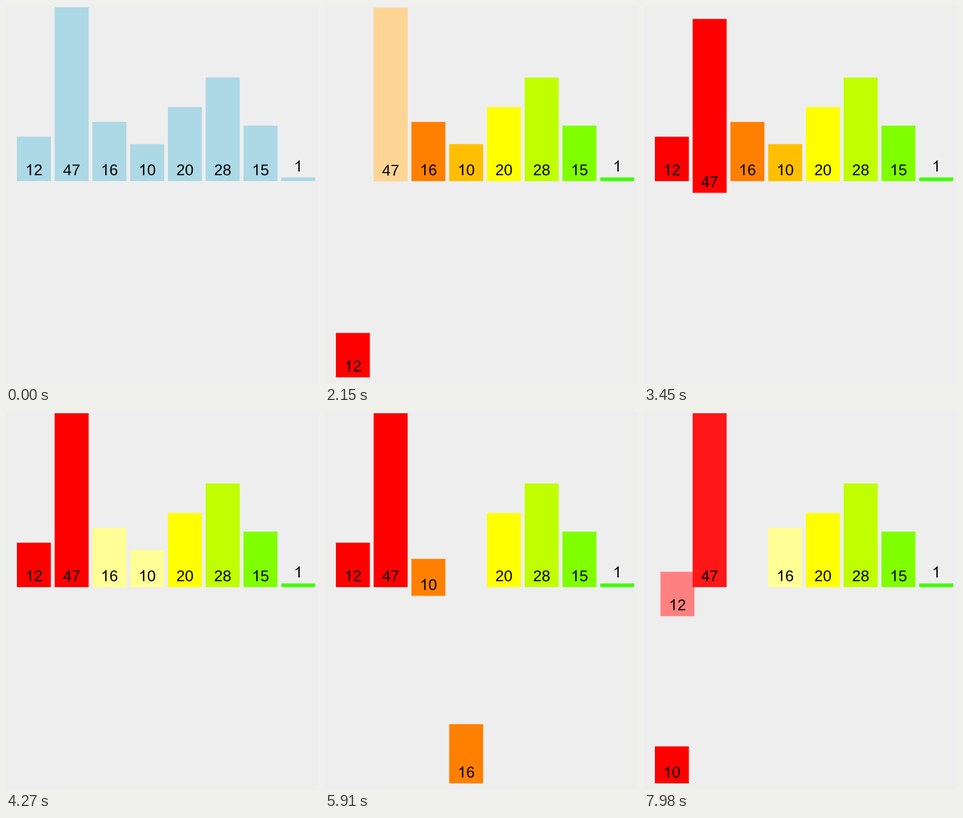
Animation of 518x626 px, one loop 8000 ms. Source, as a matplotlib script:

```python
import colorsys

import numpy as np
import matplotlib.pyplot as plt
from matplotlib.animation import FuncAnimation
from matplotlib.patches import PathPatch, Rectangle
from matplotlib.path import Path
from matplotlib.textpath import TextPath
from matplotlib.transforms import Affine2D

W, H = 518, 626
LOOP, STEP = 8000, 20
VALUES = [12, 47, 16, 10, 20, 28, 15, 1]
LEFT, PITCH, BAR_W = 18, 62.5, 56.25
BASE, DROP, UNIT = 290, 325, 288 / 47
FONT_SIZE, ADVANCE = 25.6, 0.556

BACKGROUND = np.array([238, 238, 238]) / 255
LIGHT_BLUE = np.array([173, 216, 230]) / 255


def hue(slot):
    return np.array(colorsys.hsv_to_rgb(slot * 15 / 360, 1, 1))


def pale(color):
    return np.minimum(color + 150 / 255, 1)


RED, ORANGE = hue(0), hue(2)

# start, end, {bar: (slot, lowered, color)}
STEPS = [
    (480, 725, {i: (i, 0, hue(i)) for i in range(8)}),
    (980, 1240, {0: (0, 0, pale(RED)), 1: (1, 0, pale(hue(1)))}),
    (1475, 1890, {0: (0, 1, RED)}),
    (2115, 2440, {1: (1, 1, RED)}),
    (2645, 2990, {0: (0, 0, RED)}),
    (3195, 3520, {1: (1, 0, RED)}),
    (3755, 4020, {2: (2, 0, pale(ORANGE)), 3: (3, 0, pale(hue(3)))}),
    (4255, 4650, {3: (2, 1, ORANGE)}),
    (4885, 5380, {2: (3, 1, ORANGE)}),
    (5615, 5982, {3: (2, 0, ORANGE)}),
    (6175, 6490, {2: (3, 0, ORANGE)}),
    (6735, 7060, {0: (0, 0, pale(RED)), 3: (2, 0, pale(ORANGE))}),
    (7315, 7640, {3: (0, 1, RED), 2: (3, 0, pale(ORANGE))}),
    (7880, 8180, {0: (1, 1, RED), 1: (1, 0, pale(RED))}),
]


def ease(u):
    u = min(max(u, 0), 1)
    return 4 * u**3 if u < 0.5 else 1 - 4 * (1 - u)**3


def pose(bar, t):
    """Slot, drop and color of a bar at time t, as one vector."""
    state = np.array([bar, 0, *LIGHT_BLUE], dtype=float)
    for start, end, goals in STEPS:
        if t > start and bar in goals:
            slot, low, color = goals[bar]
            goal = np.array([slot, low, *color])
            state = state + (goal - state) * ease((t - start) / (end - start))
    return state


def digit_path(char):
    if char != "1":
        return TextPath((0, 0), char, size=FONT_SIZE,
                        prop={"family": "Liberation Sans"})
    # a "1" without a foot
    outline = np.array([(763, 0), (583, 0), (583, 1147), (412, 1023),
                        (223, 930), (223, 1104), (374, 1175), (487, 1276),
                        (590, 1380), (647, 1472), (763, 1472), (763, 0)])
    return Path(outline * FONT_SIZE / 2048, closed=True)


def label_path(text):
    """Text outline centred on x = 0, with y pointing down."""
    step = ADVANCE * FONT_SIZE
    parts = []
    for k, char in enumerate(text):
        shift = (k - len(text) / 2) * step
        place = Affine2D().translate(shift, 0).scale(1, -1)
        parts.append(digit_path(char).transformed(place))
    return Path.make_compound_path(*parts)


fig = plt.figure(figsize=(W / 100, H / 100), dpi=100, facecolor=BACKGROUND)
ax = fig.add_axes([0, 0, 1, 1])
ax.set_xlim(0, W)
ax.set_ylim(H, 0)
ax.axis("off")

bars, labels = [], []
for i, value in enumerate(VALUES):
    rect = Rectangle((0, 0), BAR_W, value * UNIT, lw=0, snap=False, zorder=2 * i)
    label = PathPatch(label_path(str(value)), fc="black", lw=0, snap=False,
                      zorder=2 * i + 1)
    bars.append(ax.add_patch(rect))
    labels.append(ax.add_patch(label))


def draw(frame):
    for i, (rect, label) in enumerate(zip(bars, labels)):
        slot, low, *color = pose(i, frame * STEP)
        x = LEFT + slot * PITCH
        bottom = BASE + low * DROP
        height = rect.get_height()
        rect.set_xy((x, bottom - height))
        rect.set_facecolor(np.clip(color, 0, 1))
        # labels of very short bars sit above them
        text_y = bottom - 9.8 - (height if height < 20 else 0)
        label.set_transform(
            Affine2D().translate(x + BAR_W / 2, text_y) + ax.transData)
    return bars + labels


anim = FuncAnimation(fig, draw, frames=LOOP // STEP, interval=STEP,
                     repeat=True, repeat_delay=0, blit=False)
plt.show()
```
